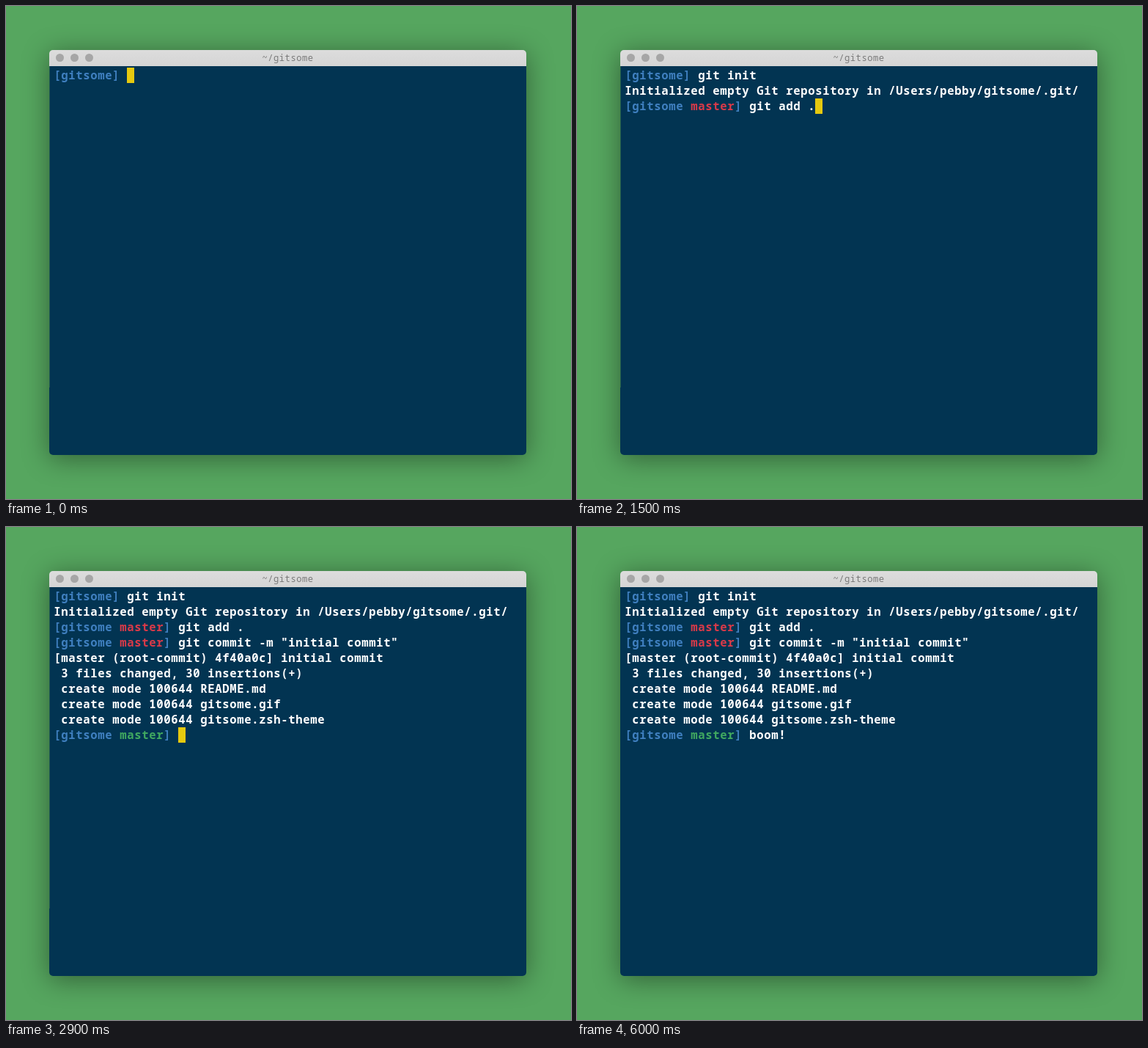
An HTML page for the animation above (6600 ms loop, 771 by 672 pixels).

```html
<!DOCTYPE html>
<html lang="en">
<head>
<meta charset="utf-8">
<title>Terminal</title>
<style>
  html, body { margin: 0; width: 100%; height: 100%; overflow: hidden; background: #56a65f; }
  .window {
    position: absolute; left: 59px; top: 60px; width: 651px; height: 552px;
    border-radius: 5px; background: linear-gradient(#dcdcdc, #d5d5d5 22px, #023452 22px);
    box-shadow: 0 5px 36px rgba(0, 0, 0, .42);
  }
  svg { position: absolute; left: 0; top: 0; }
  text { font-family: "Noto Sans Mono", "DejaVu Sans Mono", monospace; white-space: pre; }
  #title { font-size: 12.2px; fill: #7a7a7a; }
  #screen { font-size: 15.6px; font-weight: 600; fill: #fff; }
  .blue { fill: #3f7fbf; }
  .red { fill: #d93a49; }
  .green { fill: #40a860; }
</style>
</head>
<body>
<div class="window"></div>
<svg width="771" height="672">
  <g fill="#a6a6a6">
    <circle cx="73.5" cy="70.5" r="5.5"/>
    <circle cx="93.5" cy="70.5" r="5.5"/>
    <circle cx="113.5" cy="70.5" r="5.5"/>
  </g>
  <text id="title" x="349.4" y="75">~/gitsome</text>
  <rect id="edge" x="59" y="82" width="1" height="438" fill="#1f5850"/>
  <g id="screen"></g>
  <rect id="cursor" width="10" height="21" fill="#e6c90f"/>
</svg>
<script>
const LOOP = 6600, LEFT = 65, TOP = 84, CELL = 10, ROW = 21;
const [title, edge, screenText, cursor] =
  ['title', 'edge', 'screen', 'cursor'].map(id => document.getElementById(id));

const paint = (color, s) => `<tspan class="${color}">${s}</tspan>`;
const prompt = color =>
  paint('blue', '[gitsome ') + paint(color, 'master') + paint('blue', ']') + ' ';

// Each step appends output at its time in ms.
const steps = [
  [0, paint('blue', '[gitsome]') + ' '],
  [400, 'git init'],
  [800, '\nInitialized empty Git repository in /Users/pebby/gitsome/.git/\n' + prompt('red')],
  [1500, 'git add .'],
  [1900, '\n' + prompt('red')],
  [2300, 'git commit -m "initial commit"'],
  [2900, '\n[master (root-commit) 4f40a0c] initial commit' +
    '\n 3 files changed, 30 insertions(+)' +
    ['README.md', 'gitsome.gif', 'gitsome.zsh-theme']
      .map(file => '\n create mode 100644 ' + file).join('') +
    '\n' + prompt('green')],
  [4200, 'boom!']
];

// Space the glyphs out to the terminal's cell width.
const pen = document.createElement('canvas').getContext('2d');
function fitCell(el, cell) {
  const { fontWeight, fontSize, fontFamily } = getComputedStyle(el);
  pen.font = `${fontWeight} ${fontSize} ${fontFamily}`;
  const gap = cell - pen.measureText('m').width;
  el.style.letterSpacing = gap + 'px';
  return gap;
}
screenText.style.fontFamily = getComputedStyle(title).fontFamily;
fitCell(title, 7.8);
const inset = fitCell(screenText, CELL) / 2;

let shown = '';
function draw(t) {
  const output = steps.filter(([at]) => t >= at).map(([, s]) => s).join('');
  if (output !== shown) {
    shown = output;
    screenText.innerHTML = output.split('\n').map((line, i) =>
      `<text x="${LEFT + inset}" y="${TOP + 16 + ROW * i}">${line}</text>`).join('');
    const rows = screenText.children.length - 1;
    cursor.setAttribute('x', LEFT + CELL * screenText.lastChild.textContent.length);
    cursor.setAttribute('y', TOP + ROW * rows);
  }
  const blinkOff = t >= 4200 && Math.floor((t - 4200) / 600) % 2 === 1;
  cursor.style.display = blinkOff ? 'none' : '';
  edge.style.display = t < 4200 ? '' : 'none';
}

const start = performance.now();
function tick() {
  draw((performance.now() - start) % LOOP);
  requestAnimationFrame(tick);
}
tick();
</script>
</body>
</html>
```
